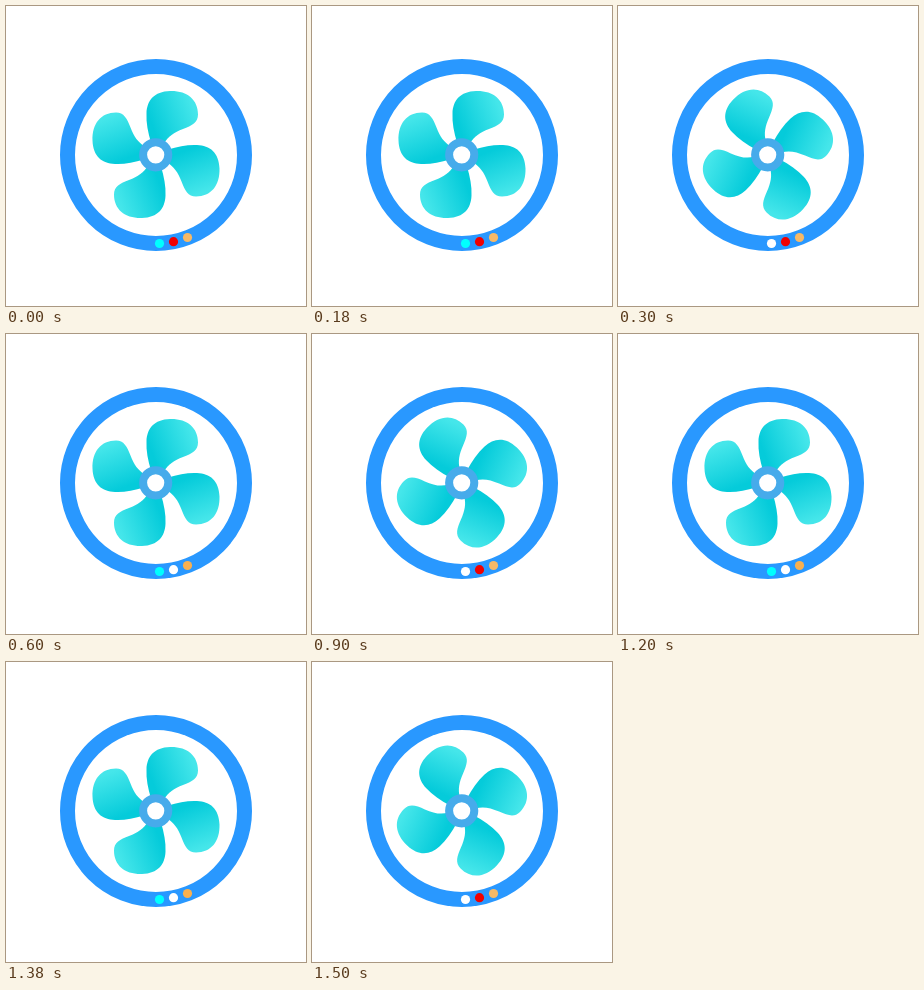
An HTML page for the animation above (1800 ms loop, 300 by 300 pixels).

```html
<!DOCTYPE html>
<html lang="en">
<head>
<meta charset="utf-8">
<title>Fan</title>
<style>
  html, body { margin: 0; width: 100%; height: 100%; overflow: hidden; background: #fff; }
  svg { display: block; width: 100vw; height: 100vh; }
</style>
</head>
<body>
<svg viewBox="0 0 300 300">
  <defs>
    <linearGradient id="shade" gradientUnits="userSpaceOnUse" x1="-4" y1="-30" x2="38" y2="-46">
      <stop offset="0" stop-color="#05cbda"/>
      <stop offset="1" stop-color="#45e6ea"/>
    </linearGradient>
    <path id="blade" fill="url(#shade)" d="M-5 -12 C-8 -22 -10 -32 -9.5 -41 C-9 -54 -2 -63 14 -63.5 C31 -64 42 -55 42 -40 C42 -32 36 -29 27 -25.500 C18 -22 12 -18 8 -11 Z"/>
  </defs>
  <circle cx="150" cy="149" r="88.500" fill="#fff" stroke="#2998ff" stroke-width="15"/>
  <g id="fan">
    <use href="#blade"/>
    <use href="#blade" transform="rotate(90)"/>
    <use href="#blade" transform="rotate(180)"/>
    <use href="#blade" transform="rotate(270)"/>
  </g>
  <circle cx="149.700" cy="148.800" r="12.600" fill="#fff" stroke="#46abeb" stroke-width="8"/>
  <circle id="cyanLamp" cx="153.500" cy="237.500" r="4.600"/>
  <circle id="redLamp" cx="167.500" cy="235.700" r="4.600"/>
  <circle id="amberLamp" cx="181.500" cy="231.500" r="4.600"/>
</svg>
<script>
  const STEP = 300, LOOP = 1800;
  const part = id => document.getElementById(id);
  const paint = (id, color) => part(id).setAttribute("fill", color);

  function draw(time) {
    const step = Math.floor((time % LOOP) / STEP);
    const turned = step % 2 === 1;
    const blink = !turned && step > 0;
    part("fan").setAttribute("transform", `translate(150 148.5) rotate(${turned ? 45 : 0})`);
    paint("cyanLamp", turned ? "#fff" : "#0ff");
    paint("redLamp", blink ? "#fff" : "#f00000");
    paint("amberLamp", blink ? "#f9b04f" : "#f7b967");
  }

  const start = performance.now();
  function tick() {
    draw(performance.now() - start);
    requestAnimationFrame(tick);
  }
  tick();
</script>
</body>
</html>
```
